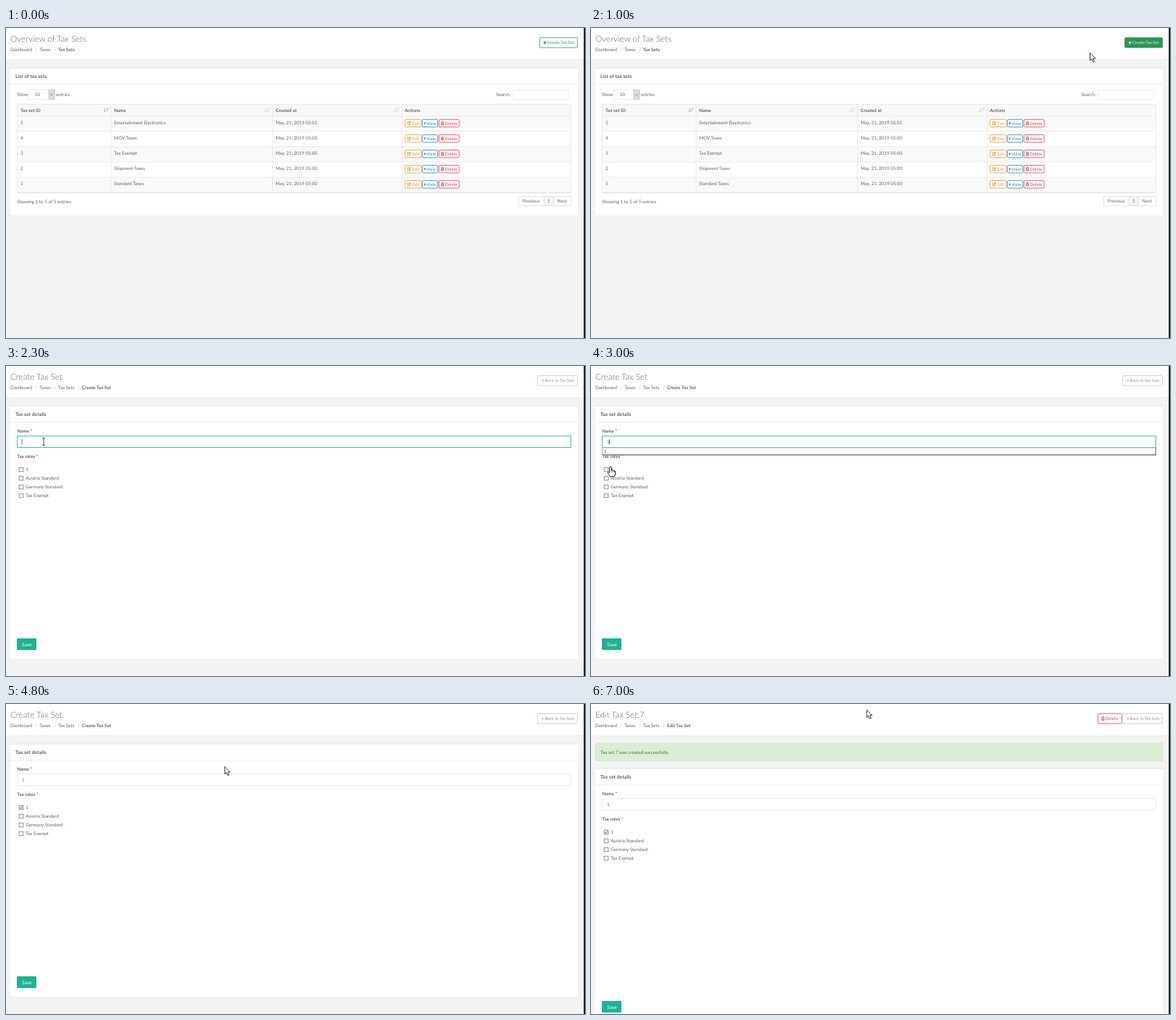
An HTML page that plays this animation: 800x428 px, repeating every 7100 ms.

```html
<!DOCTYPE html>
<html lang="en">
<head>
<meta charset="utf-8">
<title>Create a tax set</title>
<style>
html, body { margin: 0; width: 100%; height: 100%; overflow: hidden; background: #f3f3f4; }
svg { display: block; width: 800px; height: 428px; font-family: Lato, sans-serif; text-rendering: geometricPrecision; }
</style>
</head>
<body>
<svg id="stage" viewBox="0 0 800 428"></svg>
<script>
const INK = '#606365', LINE = '#e5e6e7', GREEN = '#1ab394', RED = '#e8384f';

// y is the middle of the capitals
const text = (x, y, s, { size = 6.3, fill = INK, weight = 400 } = {}) =>
  `<text x="${x}" y="${y + size * 0.36}" font-size="${size}" fill="${fill}" font-weight="${weight}">${s}</text>`;
const bold = (x, y, s, size) => text(x, y, s, { weight: 700, size });
const rect = (x, y, w, h, fill, stroke = 'none', r = 0) =>
  `<rect x="${x}" y="${y}" width="${w}" height="${h}" fill="${fill}" stroke="${stroke}" stroke-width=".8" rx="${r}"/>`;
const path = (d, stroke, fill = 'none', w = 0.8) =>
  `<path d="${d}" stroke="${stroke}" fill="${fill}" stroke-width="${w}"/>`;
const group = (id, body, extra = '') => `<g id="${id}" ${extra}>${body}</g>`;

const icons = {
  edit: (x, y, c) => path(`M${x + 3.6} ${y - 2}H${x + .4}V${y + 2.3}H${x + 4.6}V${y + .6}`, c) +
    path(`M${x + 2} ${y + .9}L${x + 5.3} ${y - 2.3}`, c, 'none', 1.4),
  view: (x, y, c) => path(`M${x} ${y - 2}L${x + 2.2} ${y}L${x} ${y + 2}Z`, 'none', c),
  trash: (x, y, c) => path(`M${x} ${y - 1.6}H${x + 4.6}M${x + 1.5} ${y - 1.8}V${y - 2.5}H${x + 3.1}V${y - 1.8}M${x + .7} ${y - 1}V${y + 2.3}H${x + 3.9}V${y - 1}M${x + 1.8} ${y - .6}V${y + 1.8}M${x + 2.9} ${y - .6}V${y + 1.8}`, c, 'none', .7),
  plus: (x, y, c) => path(`M${x} ${y}H${x + 4.4}M${x + 2.2} ${y - 2.2}V${y + 2.2}`, c, 'none', 1.2),
  back: (x, y, c) => path(`M${x + 1.7} ${y - 1.4}L${x + .4} ${y}L${x + 1.7} ${y + 1.4}M${x + 3.3} ${y - 1.4}L${x + 2} ${y}L${x + 3.3} ${y + 1.4}`, c, 'none', .7),
};

function button(x, y, w, h, icon, gap, label, color, { bg = '#fff', ink = color, pad = 3 } = {}) {
  const mid = y + h / 2;
  return rect(x, y, w, h, bg, color, 1.4) + icons[icon](x + pad, mid, ink) +
    text(x + pad + gap, mid, label, { size: 5.8, fill: ink });
}

function header(title, crumbs) {
  const xs = [6, 46.3, 72, 105];
  return rect(0, 0, 800, 43.5, '#fff') + rect(0, 43.3, 800, .8, '#e7eaec') +
    text(6, 15, title, { size: 11.65, weight: 300 }) +
    crumbs.map((c, i) => (i ? text(xs[i] - 5.8, 30, '/', { fill: '#bbb' }) : '') +
      (i === crumbs.length - 1 ? bold : text)(xs[i], 30, c)).join('');
}

const panel = (h, title) => rect(6, 55, 784, h, '#fff') + rect(6, 54.6, 784, 1.4, '#e7eaec') +
  rect(6, 77, 784, .8, '#e7eaec') + bold(13, 66.3, title, 6.8);

function sortIcon(x, color) {
  return path(`M${x + 1.3} 110.5V115.5M${x} 114.2L${x + 1.3} 115.8L${x + 2.6} 114.2M${x + 3.8} 111H${x + 7}M${x + 3.8} 113H${x + 6}M${x + 3.8} 115H${x + 5}`, color, 'none', .7);
}

function listPage() {
  const names = ['Entertainment Electronics', 'MOV Taxes', 'Tax Exempt', 'Shipment Taxes', 'Standard Taxes'];
  const rows = names.map((name, i) => {
    const y = 121.3 + i * 21.1, mid = y + 9.5, by = y + 5;
    return rect(15, y, 766, 21.1, i % 2 ? '#fff' : '#f9f9f9') + rect(15, y, 766, .8, '#e7e7e7') +
      text(20, mid, 5 - i) + text(149.3, mid, name) +
      text(372.5, mid, `May, 21, 2019 05:0${i ? 0 : 1}`) +
      button(551.3, by, 22.5, 10.4, 'edit', 7, 'Edit', '#dc9b45') +
      button(575.3, by, 21.2, 10.4, 'view', 3.2, 'View', '#2a80b9', { pad: 2.6 }) +
      button(598.3, by, 27.8, 10.4, 'trash', 5.8, 'Delete', RED, { pad: 2.5 });
  }).join('');
  const heads = ['Tax set ID', 'Name', 'Created at', 'Actions'];
  return header('Overview of Tax Sets', ['Dashboard', 'Taxes', 'Tax Sets']) +
    group('create', button(737.6, 13.3, 52, 13.8, 'plus', 5.7, 'Create Tax Set', '#2d9459', { pad: 4.8 })) +
    group('createHot', button(737.6, 13.3, 52, 13.8, 'plus', 5.7, 'Create Tax Set', '#2d9459', { pad: 4.8, bg: '#2d9459', ink: '#dff3e7' })) +
    panel(203.5, 'List of tax sets') +
    text(15.3, 91.5, 'Show') + rect(31.3, 85.2, 36.2, 13.4, '#fff', LINE) + text(39.7, 92.2, '10') +
    rect(59, 85.5, 8, 12.8, '#dcdcdc', '#c4c4c4') + path('M61.3 91.2L63 93L64.7 91.2', '#666') +
    text(69, 91.5, 'entries') + text(677.2, 91.5, 'Search:') + rect(700.7, 85.2, 77, 13.4, '#fff', LINE) +
    rect(15, 105, 766, 16.3, '#f8f8f9') + rect(15, 104.8, 766, .8, '#e2e2e2') +
    heads.map((h, i) => bold([20, 149.3, 372.5, 551][i], 113.3, h)).join('') +
    sortIcon(135, '#999') + sortIcon(358, '#ccc') + sortIcon(536.5, '#ccc') + rows +
    rect(15, 226.6, 766, 1.6, '#e4e4e4') +
    [15, 144.7, 368.2, 547, 780].map(x => rect(x, 105, .8, 122, '#e7e7e7')).join('') +
    text(15.3, 239.4, 'Showing 1 to 5 of 5 entries') +
    rect(708.5, 232.7, 72.3, 12.8, '#fff', '#ddd') + rect(743.2, 232.7, 13.2, 12.8, '#f4f4f4', '#ddd') +
    text(713.8, 239.2, 'Previous') + text(748, 239.2, '1') + text(761.8, 239.2, 'Next');
}

const backButton = button(734.6, 13.3, 55.1, 13.8, 'back', 4.6, 'Back to Tax Sets', '#c4c4c4', { pad: 5.2, ink: '#999' });

function form() {
  const rates = ['1', 'Austria Standard', 'Germany Standard', 'Tax Exempt'];
  return panel(349, 'Tax set details') +
    bold(15.3, 89.5, 'Name *') + rect(15.4, 96.8, 765, 15.6, '#fff', LINE) +
    rect(15.4, 96.8, 765, 15.6, 'none', GREEN).replace('<rect', '<rect id="focus"') +
    group('typed', text(22, 104.8, '1')) + group('caret', rect(25.3, 101, .7, 7.4, '#333')) +
    bold(15.3, 124.5, 'Tax rates *') +
    rates.map((r, i) => rect(18.2, 140.2 + i * 12, 5.6, 5.6, '#fff', '#777') + text(27.2, 142.8 + i * 12, r)).join('') +
    group('check', path('M19.3 143L20.6 144.4L22.9 141.5', '#333', 'none', .9)) +
    group('hint', rect(16, 113, 765, 10.6, '#8b8b8b') + rect(15.4, 112.8, 764.4, 9.2, '#fff', '#999') +
      text(18, 117.7, '1', { size: 5.8, fill: '#333' })) +
    rect(15, 376, 27, 16, GREEN, 'none', 1).replace('<rect', '<rect id="save"') +
    text(22, 384.3, 'Save', { fill: '#fff', size: 6.8 });
}

const stage = document.getElementById('stage');
stage.innerHTML = rect(0, 0, 800, 428, '#f3f3f4') +
  group('list', listPage()) +
  group('new', header('Create Tax Set', ['Dashboard', 'Taxes', 'Tax Sets', 'Create Tax Set']) + backButton +
    group('footer', rect(0, 417, 800, 11, '#fff') + rect(0, 417, 800, .8, '#e7eaec') +
      bold(6, 426.2, 'Copyright') + text(35.8, 426.2, 'Drelvak GmbH © 2019') +
      rect(-1, 423, 22, 6, '#f6f6f6', '#ddd'))) +
  group('edit', header('Edit Tax Set:7', ['Dashboard', 'Taxes', 'Tax Sets', 'Edit Tax Set']) + backButton +
    button(700.4, 13.3, 32.8, 13.8, 'trash', 5.8, 'Delete', RED, { pad: 4.8 }) +
    rect(6.2, 54.4, 783.6, 24, '#dcedd5', '#d3e6c5', 1) +
    text(13, 66.5, 'Tax set 7 was created successfully.', { fill: '#3c763d' })) +
  group('form', form()) +
  rect(798.4, 0, 1.6, 428, '#000') +
  group('cursor',
    group('arrow', path('M0 0V10.3L2.3 8.2L3.9 12L5.8 11.2L4.2 7.5H7.4Z', '#000', '#fff')) +
    group('beam', path('M-1.8-5H1.8M0-5V5M-1.8 5H1.8', '#222')) +
    group('hand', path('M-1.3 8.6V1Q0-1 1.3 1V5.2Q2.6 4.2 3.4 5.6Q4.8 4.8 5.3 6.3Q6.6 5.8 6.7 7.4V10.3L5.4 14H-.4L-3.8 9.3Q-4-.1-1.3 8.6Z'.replace('-4-.1', '-3.6 6.6'), '#000', '#fff', .9) +
      path('M1.3 5V8M3.4 5.6V8M5.3 6.3V8.2', '#000', 'none', .6)));

// time, x, y
const track = [
  [200, 452, 268], [800, 764, 17], [900, 764, 17], [1000, 689.5, 34.5], [1400, 42.5, 122.8],
  [1700, 42.5, 122.8], [2000, 52, 104.5], [2600, 52, 104.5], [2900, 27, 138.7],
  [3400, 27, 138.7], [3800, 30.5, 388], [4600, 30.5, 388], [4800, 302.3, 86.6],
  [6600, 302.3, 86.6], [7000, 381, 8.2],
];

function cursorAt(t) {
  const i = track.findIndex(k => k[0] > t);
  if (i < 0) return track[track.length - 1].slice(1);
  if (i === 0) return track[0].slice(1);
  const [a, b] = [track[i - 1], track[i]];
  const p = (t - a[0]) / (b[0] - a[0]), e = p * p * (3 - 2 * p);
  return [a[1] + (b[1] - a[1]) * e, a[2] + (b[2] - a[2]) * e];
}

const el = Object.fromEntries([...stage.querySelectorAll('[id]')].map(n => [n.id, n]));
const show = (id, on) => el[id].setAttribute('display', on ? 'inline' : 'none');

function draw(t) {
  const within = (a, b) => t >= a && t < b;
  const edit = t >= 5400, list = t < 1300;
  show('list', list);
  show('new', !list && !edit);
  show('edit', edit);
  show('form', !list);
  el.form.setAttribute('transform', `translate(0 ${edit ? 34 : 0})`);

  const hot = within(700, 1300);
  show('create', !hot);
  show('createHot', hot);
  show('footer', t < 1600);
  show('focus', within(2000, 3300));
  show('caret', within(2000, 3300));
  el.caret.setAttribute('transform', `translate(${t < 2500 ? -3.6 : 0} 0)`);
  show('typed', t >= 2500);
  show('hint', within(2500, 3300));
  show('check', t >= 3300);
  el.save.setAttribute('fill', within(4100, 4400) ? '#15967c' : within(3700, 4700) ? '#18a689' : GREEN);

  const hand = within(700, 1000) || within(2900, 3500) || within(3800, 4700);
  const beam = within(1900, 2700);
  const [x, y] = cursorAt(t);
  show('cursor', t >= 200);
  show('hand', hand);
  show('beam', beam);
  show('arrow', !hand && !beam);
  el.cursor.setAttribute('transform', `translate(${x} ${y})`);
}

const start = performance.now();
function tick() {
  const t = (performance.now() - start) % 7100;
  draw(Math.floor(t / 100) * 100);
  requestAnimationFrame(tick);
}
tick();
</script>
</body>
</html>
```
